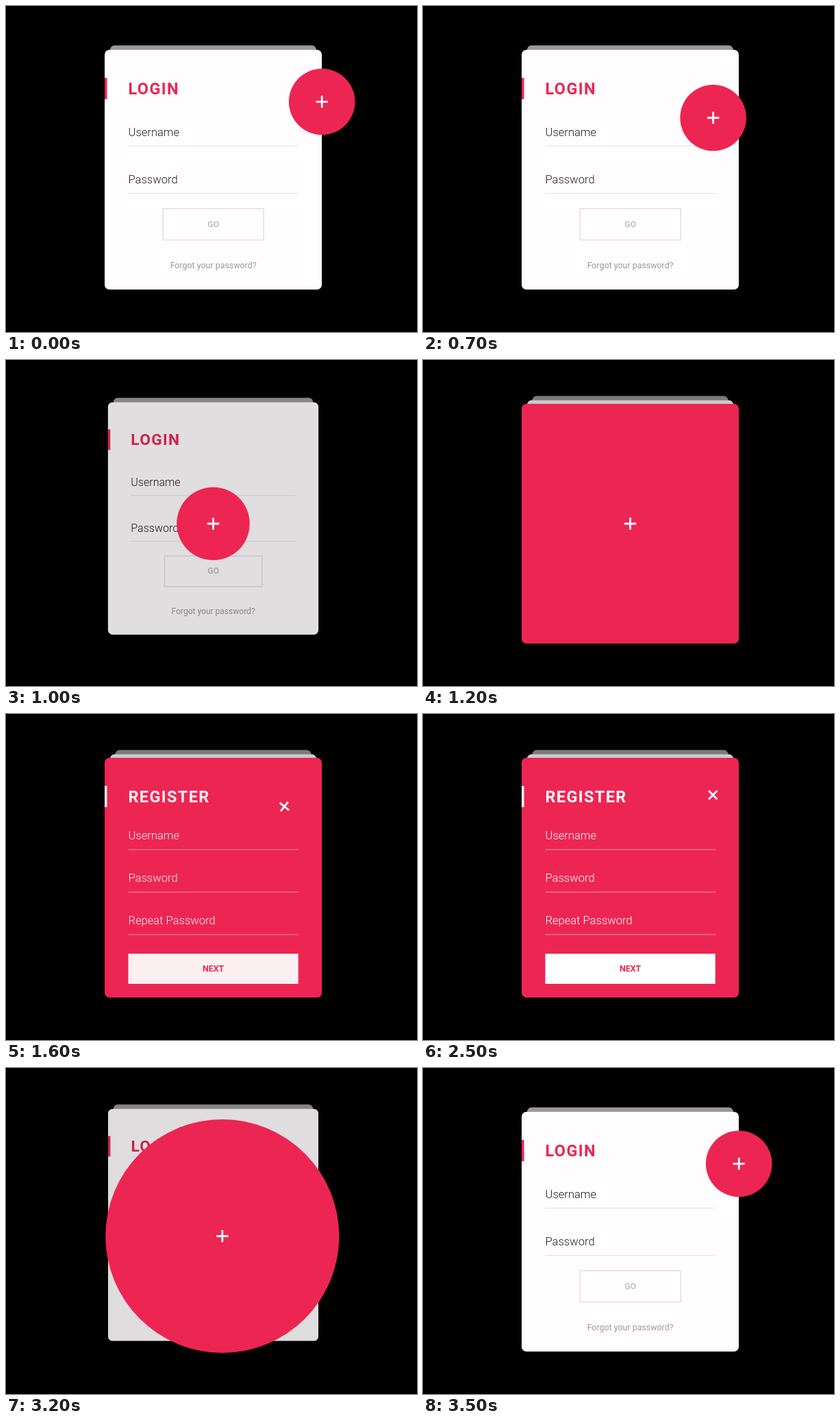
Animation of 600 by 476 pixels, one loop 3900 ms. Source, as an HTML page:

```html
<!DOCTYPE html>
<html lang="en">
<head>
<meta charset="utf-8">
<title>Login and register</title>
<style>
  html, body { margin: 0; height: 100%; overflow: hidden; background: #000; }
  svg { display: block; width: 600px; height: 476px; font-family: Roboto, sans-serif; }
  .title { font-size: 23.46px; font-weight: 700; letter-spacing: 1.38px; }
  .label { font-size: 16.56px; font-weight: 300; }
  .small { font-size: 12.42px; text-anchor: middle; }
  .bold { font-weight: 700; }
  .red { fill: #ed2553; }
</style>
</head>
<body>
<svg viewBox="0 0 600 476">
  <clipPath id="cardClip"><rect x="144" y="64" width="317" height="350" rx="6.9"/></clipPath>

  <g id="login">
    <rect x="152" y="57.5" width="301" height="20" rx="6.6" fill="#fff" fill-opacity=".6"/>
    <rect x="144" y="64" width="317" height="350" rx="6.9" fill="#fffdfe"/>
    <rect class="red" x="144" y="105" width="3.5" height="31"/>
    <text class="title red" x="178.5" y="128.7">LOGIN</text>
    <g fill="#222">
      <text class="label" x="178.5" y="190">Username</text>
      <text class="label" x="178.5" y="259">Password</text>
    </g>
    <path d="M178.5 204.5H427M178.5 273.5H427" stroke="#e0dfe3"/>
    <rect x="229.2" y="295.8" width="147" height="45.8" fill="none" stroke="#e2e1e6" stroke-width="1.6"/>
    <text class="small bold" x="302.8" y="322.5" fill="#c3c2c8">GO</text>
    <text class="small" x="302.6" y="383" fill="#999">Forgot your password?</text>
  </g>

  <g id="overlay">
    <circle id="disc" class="red"/>
    <g id="register" fill="#fff">
      <rect x="144" y="105" width="3.5" height="31"/>
      <text class="title" x="178.5" y="128.7">REGISTER</text>
      <text class="label" x="178.5" y="183">Username</text>
      <text class="label" x="178.5" y="245">Password</text>
      <text class="label" x="178.5" y="307">Repeat Password</text>
      <path d="M178.5 198H427M178.5 260H427M178.5 322H427" stroke="#fff" stroke-opacity=".5"/>
      <rect x="178.5" y="350" width="248.2" height="44"/>
      <text class="small bold red" x="302.6" y="376.3">NEXT</text>
    </g>
    <path id="cross" d="M-8.7 0H8.7M0-8.7V8.7" stroke="#fff" stroke-width="2.8"/>
  </g>
</svg>
<script>
  const LOOP = 3900, STEP = 100;
  const CENTER = { x: 302.5, y: 239 }, CORNER = { x: 461.2, y: 139.8 };
  const SMALL = 48.3, LARGE = 241.5;
  const [login, overlay, disc, register, cross] =
    ['login', 'overlay', 'disc', 'register', 'cross'].map(id => document.getElementById(id));

  const mix = (a, b, p) => a + (b - a) * p;
  const swing = p => 0.5 - Math.cos(Math.PI * p) / 2;

  // cubic-bezier(.4, 0, .2, 1)
  function material(x) {
    let low = 0, high = 1, s;
    for (let i = 0; i < 24; i++) {
      s = (low + high) / 2;
      const at = 1.2 * s * (1 - s) ** 2 + 0.6 * s * s * (1 - s) + s ** 3;
      if (at < x) low = s; else high = s;
    }
    return s * s * (3 - 2 * s);
  }

  function phase(t, start, duration, ease = material) {
    const p = (t - start) / duration;
    return p <= 0 ? 0 : p >= 1 ? 1 : ease(p);
  }

  function draw(t) {
    // The login card steps back and later returns.
    const returned = phase(t, 3080, 400);
    const scaled = phase(t, 880, 300) - returned;
    const lifted = phase(t, 880, 300) ** 1.22 - returned ** 1.22;
    login.setAttribute('transform',
      `translate(${CENTER.x} ${CENTER.y - 14 * lifted}) scale(${1 - 0.05 * scaled}) translate(${-CENTER.x} ${-CENTER.y})`);
    login.setAttribute('opacity', 1 - 0.2 * scaled);

    // The button slides to the middle, grows, then shrinks back along an arc.
    const leaving = phase(t, 3142, 350);
    const centered = phase(t, 610, 360) - leaving;
    const r = mix(SMALL, LARGE, phase(t, 970, 300) - returned);
    const x = mix(CORNER.x, CENTER.x, centered);
    const y = mix(CORNER.y, CENTER.y, centered) + 44 * returned * (1 - leaving);
    disc.setAttribute('cx', x);
    disc.setAttribute('cy', y);
    disc.setAttribute('r', r);
    overlay.setAttribute('clip-path', t >= 1000 && t < 3080 ? 'url(#cardClip)' : 'none');

    // The plus turns into a close mark while the form fades in.
    const turn = phase(t, 1350, 430) - phase(t, 2500, 450);
    const shift = r * turn / 2;
    cross.setAttribute('transform', `translate(${x + shift} ${y - shift}) rotate(${45 * turn})`);
    register.setAttribute('opacity', phase(t, 1350, 300, swing) - phase(t, 2500, 300, swing));
  }

  function tick() {
    const t = performance.now() % LOOP;
    draw(Math.floor(t / STEP) * STEP);
    requestAnimationFrame(tick);
  }
  tick();
</script>
</body>
</html>
```
